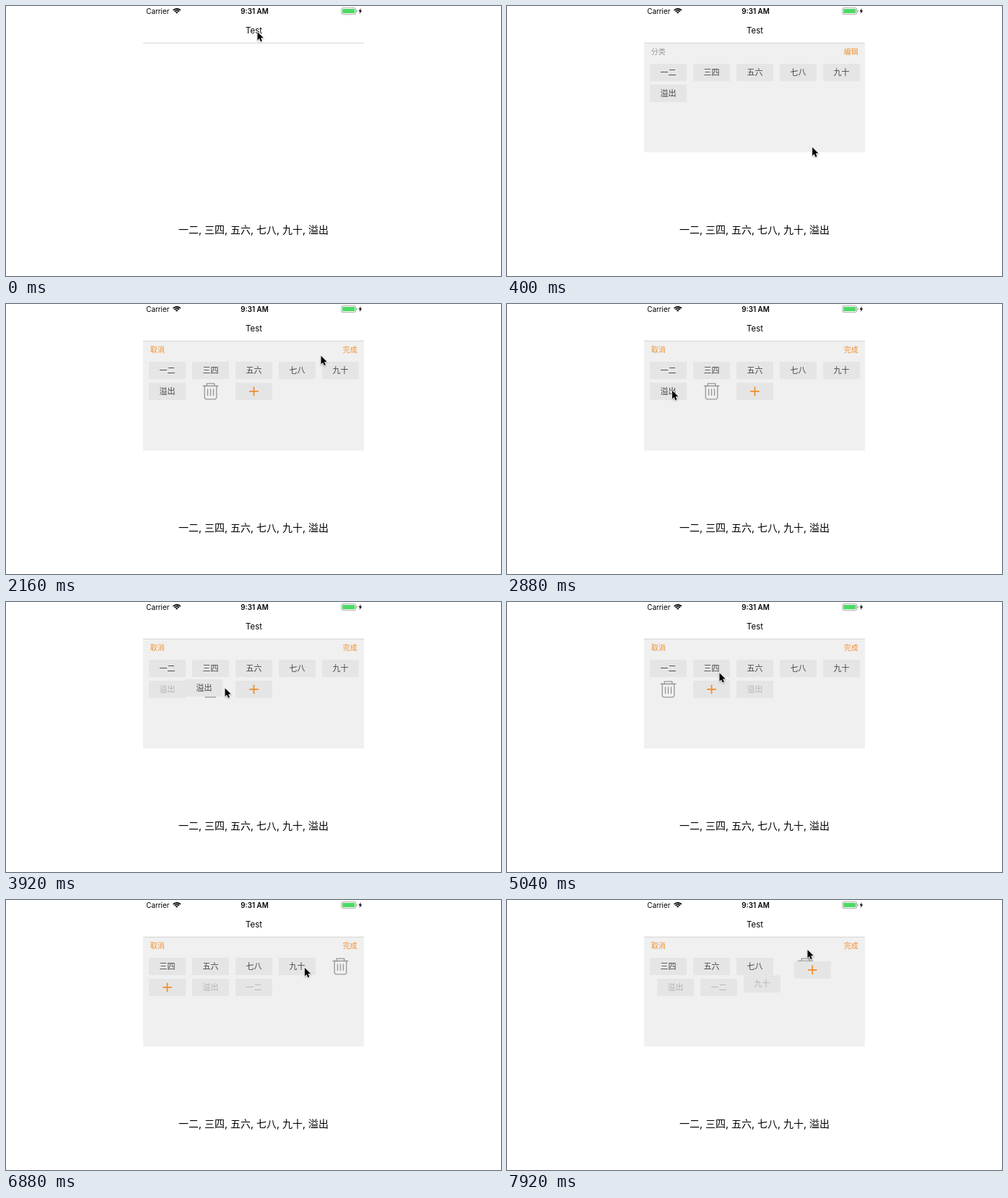
Write an HTML page with a canvas that moves like this. It is 686x374 px and loops after 8 s.

```html
<!DOCTYPE html>
<html lang="zh">
<head>
<meta charset="utf-8">
<title>Tag editor</title>
<style>
html, body { margin: 0; width: 100%; height: 100%; overflow: hidden; background: #fff; }
canvas { display: block; width: 686px; height: 374px; }
</style>
</head>
<body>
<canvas id="stage"></canvas>
<script>
const W = 686, H = 374, LOOP = 8000, STEP = 80;
const canvas = document.getElementById('stage');
const ctx = canvas.getContext('2d');
const scale = window.devicePixelRatio || 1;
canvas.width = W * scale;
canvas.height = H * scale;

const FONT = 'Inter, "Noto Sans CJK SC", "Noto Sans CJK", sans-serif';
const INK = '#000', ORANGE = '#f0902f', CHIP = '#e5e5e5', DARK = '#444', FADED = '#b4b4b4';
const TAGS = ['一二', '三四', '五六', '七八', '九十', '溢出'];
const TRASH = 6, PLUS = 7;
const OPEN_AT = 110, EDIT_AT = 1920, HOLD = 320, SLIDE = 300;

// A grabbed tag is pulled for HOLD ms; the tags reorder at drop
const DRAGS = [
  { tag: 5, grab: 3240, drop: 3940 },
  { tag: 0, grab: 5640, drop: 6175 },
  { tag: 4, grab: 7080, drop: 7698 }
];

// Pointer moves: bow bends the path down, skew below 1 speeds up the start
const HOME = [348.5, 35];
const MOVES = [
  { from: 80, to: 1440, at: [475, 62], bow: 150, skew: 0.4 },
  { from: 1920, to: 2880, at: [229, 119] },
  { from: 3240, to: 3240 + HOLD, at: [280, 117] },
  { from: 3840, to: 4560, at: [327, 120], skew: 0.315 },
  { from: 4640, to: 5360, at: [229, 88], bow: -14, skew: 1.62 },
  { from: 5640, to: 5640 + HOLD, at: [229, 118] },
  { from: 6120, to: 6880, at: [414, 93], bow: 46 },
  { from: 7080, to: 7080 + HOLD, at: [465, 103] },
  { from: 7640, to: 7920, at: [416.5, 68] }
];

const clamp = v => Math.max(0, Math.min(1, v));
const ease = v => { v = clamp(v); return v * v * (3 - 2 * v); };
const mix = (a, b, p) => a + (b - a) * p;
const blend = (a, b, p) => [mix(a[0], b[0], p), mix(a[1], b[1], p)];

function pointer(t) {
  let pos = HOME;
  for (const { from, to, at, bow = 0, skew = 1 } of MOVES) {
    if (t <= from) break;
    const p = ease(clamp((t - from) / (to - from)) ** skew);
    pos = blend(pos, at, p);
    pos[1] += bow * Math.sin(Math.PI * p);
  }
  return pos;
}

const slot = i => [198 + 60 * (i % 5), 80 + 29 * Math.floor(i / 5)];

function layout(t) {
  let order = [...TAGS.keys(), TRASH, PLUS];
  let places = order.map(slot);
  for (const { tag, drop } of DRAGS) {
    if (t < drop) break;
    const next = order.filter(i => i !== tag).concat(tag);
    const p = ease((t - drop) / SLIDE);
    places = places.map((_, i) => blend(slot(order.indexOf(i)), slot(next.indexOf(i)), p));
    order = next;
  }
  return places;
}

function text(str, x, y, size, color, align = 'left', weight = 400) {
  ctx.font = `${weight} ${size}px ${FONT}`;
  ctx.textAlign = align;
  ctx.fillStyle = color;
  ctx.fillText(str, x, y);
}

function line(...pts) {
  ctx.beginPath();
  pts.forEach(([x, y], i) => i ? ctx.lineTo(x, y) : ctx.moveTo(x, y));
}

function box(x, y, w, h, r, color) {
  ctx.beginPath();
  ctx.roundRect(x, y, w, h, r);
  ctx.fillStyle = color;
  ctx.fill();
}

function chip([x, y], label, color) {
  box(x, y, 51, 24, 1, CHIP);
  if (label) text(label, x + 25.5, y + 16.3, 11, color, 'center');
}

function plus([x, y]) {
  chip([x, y]);
  ctx.fillStyle = ORANGE;
  ctx.fillRect(x + 19.2, y + 11.1, 12.6, 1.8);
  ctx.fillRect(x + 24.6, y + 5.7, 1.8, 12.6);
}

function trash([x, y]) {
  ctx.save();
  ctx.translate(x + 25.5, y + 12);
  ctx.strokeStyle = '#969696';
  ctx.lineWidth = 1.3;
  ctx.lineJoin = ctx.lineCap = 'round';
  line([-10.3, -7.5], [10.3, -7.5]);
  ctx.stroke();
  line([-5.3, -7.5], [-5.3, -10.8], [5.3, -10.8], [5.3, -7.5]);
  ctx.stroke();
  line([-8.3, -7.5], [-8.3, 9], [-6.5, 10.9], [6.5, 10.9], [8.3, 9], [8.3, -7.5]);
  ctx.stroke();
  for (const bar of [-4, 0, 4]) {
    line([bar, -3], [bar, 5.5]);
    ctx.stroke();
  }
  ctx.restore();
}

function statusBar() {
  text('Carrier', 194.3, 10.5, 9.8, INK);
  text('9:31 AM', 344.5, 10.5, 9.8, INK, 'center', 600);

  ctx.lineWidth = 1.7;
  ctx.strokeStyle = INK;
  for (const r of [7, 4.4, 1.7]) {
    ctx.beginPath();
    ctx.arc(236.7, 10.8, r, -Math.PI * 0.76, -Math.PI * 0.24);
    ctx.stroke();
  }

  box(464.5, 2.2, 20.6, 9.6, 2.5, '#999');
  box(465.3, 3, 19, 8, 1.8, '#fff');
  box(466.2, 3.9, 17.2, 6.2, 1, '#4cd964');
  box(485.5, 5.5, 1.2, 3, 0.6, '#999');
  line([491.8, 3], [488.7, 7.5], [490.7, 7.5], [489.9, 11], [493.3, 6.3], [491.2, 6.3]);
  ctx.fillStyle = INK;
  ctx.fill();
}

function panel(t) {
  const open = ease((t - OPEN_AT) / SLIDE);
  if (!open) return;
  const editing = t >= EDIT_AT;
  ctx.save();
  ctx.beginPath();
  ctx.rect(190, 51, 306, 152 * open);
  ctx.clip();
  ctx.fillStyle = '#f0f0f0';
  ctx.fillRect(190, 51, 306, 152);
  text(editing ? '取消' : '分类', 199.8, 67.3, 10, editing ? ORANGE : '#999');
  text(editing ? '完成' : '编辑', 486.8, 67.3, 10, ORANGE, 'right');

  const places = layout(t);
  TAGS.forEach((label, i) => {
    const gone = DRAGS.some(d => d.tag === i && t > d.grab);
    chip(places[i], label, gone ? FADED : DARK);
  });
  if (editing) {
    ctx.globalAlpha = clamp((t - EDIT_AT + STEP) / 240);
    trash(places[TRASH]);
    plus(places[PLUS]);
    ctx.globalAlpha = 1;
  }

  const drag = DRAGS.find(d => t > d.grab && t < d.drop);
  if (drag) {
    const from = pointer(drag.grab), to = pointer(Math.min(t, drag.grab + HOLD));
    const [x, y] = places[drag.tag];
    chip([x + to[0] - from[0], y + to[1] - from[1]], TAGS[drag.tag], DARK);
  }
  ctx.restore();
}

function arrow([x, y]) {
  ctx.save();
  ctx.translate(x, y + 0.9);
  line([0, 0], [0, 11.6], [2.6, 9.2], [4.4, 13.3], [6.4, 12.4], [4.6, 8.4], [8.2, 8.2]);
  ctx.closePath();
  ctx.shadowColor = 'rgba(0,0,0,.35)';
  ctx.shadowBlur = 2 * scale;
  ctx.shadowOffsetY = scale;
  ctx.strokeStyle = '#fff';
  ctx.lineWidth = 1.2;
  ctx.stroke();
  ctx.shadowColor = 'transparent';
  ctx.fillStyle = INK;
  ctx.fill();
  ctx.restore();
}

function draw(t) {
  ctx.setTransform(scale, 0, 0, scale, 0, 0);
  ctx.fillStyle = '#fff';
  ctx.fillRect(0, 0, W, H);
  statusBar();
  text('Test', 343.5, 37.8, 11.4, INK, 'center');
  panel(t);
  ctx.fillStyle = '#cfcfcf';
  ctx.fillRect(190, 50.8, 306, 0.9);
  text(TAGS.join(', '), 343, 315.3, 14, INK, 'center');
  arrow(pointer(t));
}

const start = performance.now();
function tick() {
  const t = (performance.now() - start) % LOOP;
  draw(Math.floor(t / STEP) * STEP);
  requestAnimationFrame(tick);
}
tick();
</script>
</body>
</html>
```
